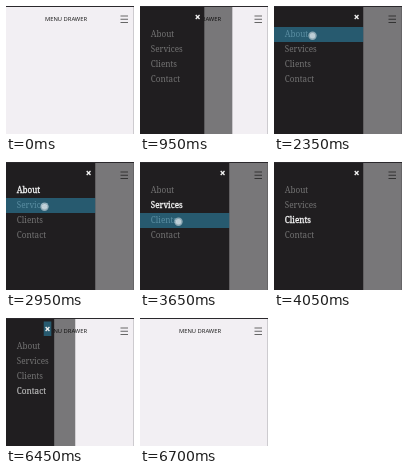
An HTML page with a canvas for the animation above (8 s loop, 128 by 128 pixels).

```html
<!DOCTYPE html>
<html lang="en">
<head>
<meta charset="utf-8">
<title>Menu drawer</title>
<style>
html, body { margin: 0; width: 100%; height: 100%; overflow: hidden; background: #f2eff3; }
canvas { display: block; width: 128px; height: 128px; }
</style>
</head>
<body>
<canvas id="stage"></canvas>
<script>
const SIZE = 128, LOOP = 8000, STEP = 50, DRAWER = 89.5;
const OPEN = { at: 770, span: 420 }, CLOSE = { at: 6368, span: 300 };
const ITEMS = ['About', 'Services', 'Clients', 'Contact'];
const TAPS = [2250, 2950, 3650, 4650];             // row is touched
const FADES = [2350, 2950, 3750, 4750, CLOSE.at];  // text colour starts to change
const GLOW = 'rgba(51,181,229,0.4)';

const canvas = document.getElementById('stage');
const ctx = canvas.getContext('2d');
const ratio = window.devicePixelRatio || 1;
canvas.width = canvas.height = Math.round(SIZE * ratio);

const clamp = v => Math.min(1, Math.max(0, v));
const within = (t, from, to) => t >= from && t < to;

// cubic-bezier(.25, .1, .25, 1)
function ease(x) {
  x = clamp(x);
  if (x === 0 || x === 1) return x;
  const curve = (s, a, b) => 3 * s * (1 - s) * (1 - s) * a + 3 * s * s * (1 - s) * b + s * s * s;
  let lo = 0, hi = 1;
  for (let i = 0; i < 20; i++) {
    const mid = (lo + hi) / 2;
    if (curve(mid, 0.25, 0.25) < x) lo = mid; else hi = mid;
  }
  return curve(lo, 0.1, 1);
}

function rect(color, x, y, w, h) {
  ctx.fillStyle = color;
  ctx.fillRect(x, y, w, h);
}

function dot(x, y) {
  const disc = (r, alpha) => {
    ctx.fillStyle = `rgba(240,243,247,${alpha})`;
    ctx.beginPath();
    ctx.arc(x, y, r, 0, Math.PI * 2);
    ctx.fill();
  };
  disc(4.2, 0.5);
  disc(2.7, 0.5);
}

function drawPage(t) {
  rect('#f2eff3', 0, 0, SIZE, SIZE);
  rect('#a9a7aa', 127.5, 0, 0.5, SIZE);
  ctx.font = '5.8px "Noto Sans", "Open Sans", sans-serif';
  ctx.textAlign = 'center';
  ctx.fillStyle = '#222';
  ctx.fillText('MENU DRAWER', 60, 15);
  for (const y of [9.6, 12.8, 16]) rect('#444', 114.5, y, 7.5, 0.8);
  if (within(t, 800, 950)) rect(GLOW, 113, 5, 11, 16);
}

function drawItem(name, i, t) {
  const lit = ease((t - FADES[i]) / 300) - ease((t - FADES[i + 1]) / 300);
  const shade = Math.round(115 + 131 * lit);
  const color = `rgb(${shade},${shade},${shade})`;
  const y = 30.8 + 15 * i;
  ctx.fillStyle = color;
  ctx.fillText(name, 10.8, y);
  if (lit > 0) {
    ctx.strokeStyle = color;
    ctx.lineWidth = 0.3 * lit;
    ctx.strokeText(name, 10.8, y);
  }
  if (within(t, TAPS[i], TAPS[i] + 150)) {
    rect(GLOW, 0, 21 + 15 * i, DRAWER, 15);
    dot(38.5, 29.7 + 15 * i);
  }
}

function drawDrawer(w, t) {
  ctx.save();
  ctx.beginPath();
  ctx.rect(0, 0, w, SIZE);
  ctx.clip();
  rect('#201e20', 0, 0, w, SIZE);
  ctx.font = '8.15px "Noto Serif", serif';
  ctx.textAlign = 'left';
  ITEMS.forEach((name, i) => drawItem(name, i, t));

  const x = w - 6.9, y = 11, r = 1.9;
  if (within(t, 6400, 6550)) rect(GLOW, x - 3.8, 3.5, 7.6, 14.5);
  ctx.strokeStyle = '#f1f1f1';
  ctx.lineWidth = 1.35;
  ctx.beginPath();
  ctx.moveTo(x - r, y - r);
  ctx.lineTo(x + r, y + r);
  ctx.moveTo(x + r, y - r);
  ctx.lineTo(x - r, y + r);
  ctx.stroke();
  ctx.restore();
}

function draw(t) {
  const k = ease((t - OPEN.at) / OPEN.span) - ease((t - CLOSE.at) / CLOSE.span);
  ctx.setTransform(canvas.width / SIZE, 0, 0, canvas.height / SIZE, 0, 0);
  drawPage(t);
  if (k > 0) {
    rect('rgba(0,0,0,0.5)', 0, 0, SIZE * k, SIZE);
    drawDrawer(DRAWER * k, t);
  }
  if (within(t, 650, 800)) dot(118, 14.6);
  if (within(t, 6250, 6400)) dot(82.6, 11.5);
  rect('#2a282c', 0, 0, SIZE, 1);
}

const start = performance.now();
function tick() {
  const t = (performance.now() - start) % LOOP;
  draw(Math.floor(t / STEP) * STEP);
  requestAnimationFrame(tick);
}
tick();
</script>
</body>
</html>
```
